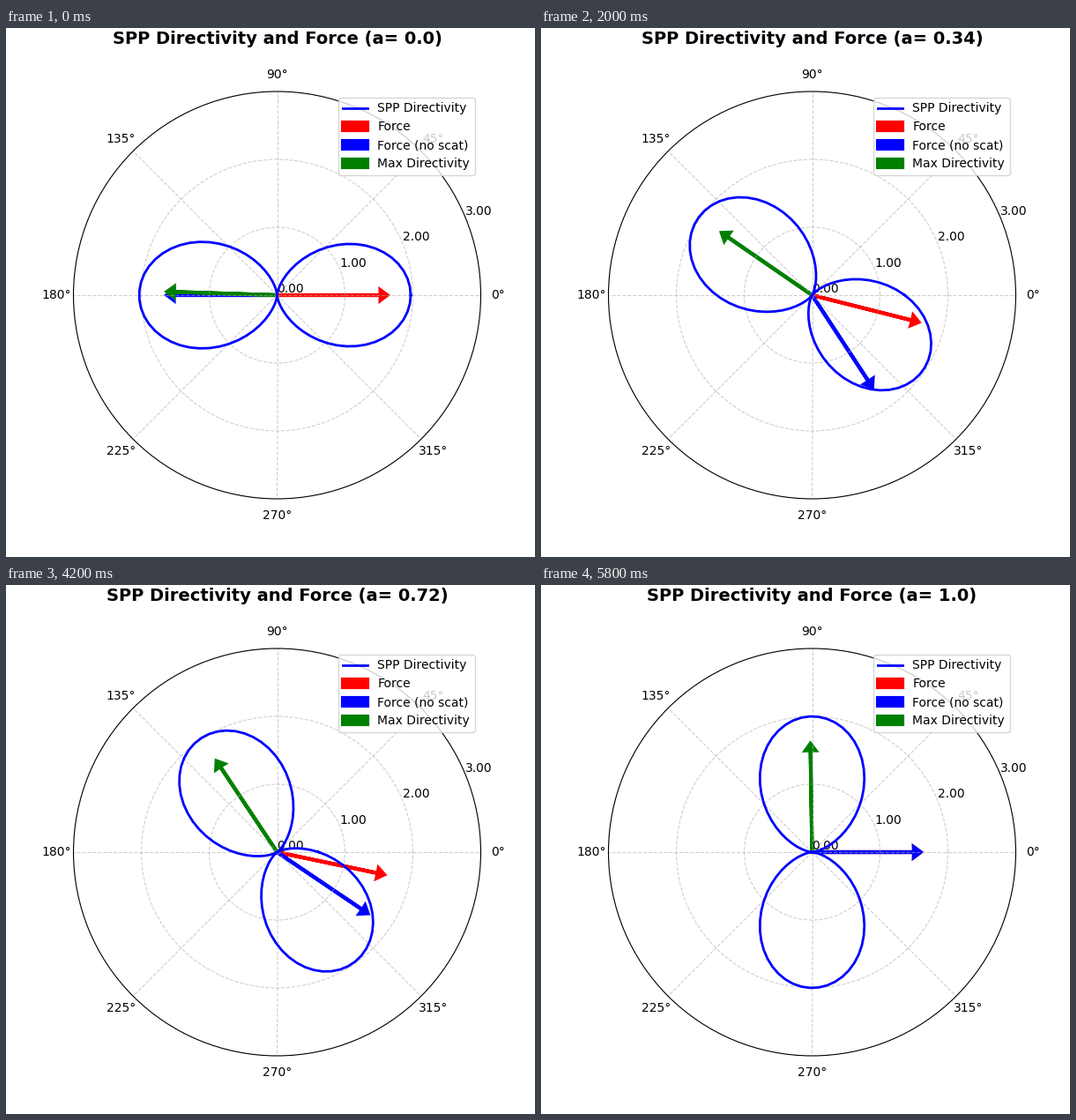
These frames come from a looping animation (600 px wide and 600 px high, 6000 ms). A matplotlib script:

```python
import numpy as np
import matplotlib.pyplot as plt
from matplotlib.animation import FuncAnimation

FRAMES = 30
RATIO = 0.917   # weight of the transverse dipole component
OFFSET = 0.008  # isotropic part of the longitudinal component

theta = np.linspace(0, 2 * np.pi, 100)
ratios = np.linspace(0, 1, FRAMES)


def directivity(a):
    amp = np.sqrt(1 - a) * (np.cos(theta) - OFFSET) - RATIO * np.sqrt(a) * np.sin(theta)
    power = (1 - a) * (1 + 2 * OFFSET**2) + RATIO**2 * a
    return 2 * amp**2 / power


def force_angle(a):
    return np.arctan2(-np.sqrt(a * (1 - a)), 1.65 + 0.67 * a)


def free_force_angle(a):
    fx = RATIO * a - 0.0075 * (1 - a)
    return np.arctan2(-np.sqrt(a * (1 - a)), fx)


fig = plt.figure(figsize=(6, 6), dpi=100)
ax = fig.add_subplot(projection="polar")
curve, = ax.plot(theta, directivity(0), color="blue", lw=2, label="SPP Directivity")


def add_arrow(color, label):
    return ax.arrow(0, 0, 0, 1.5, head_width=0.1, head_length=0.1,
                    color=color, lw=3, label=label)


force = add_arrow("red", "Force")
free_force = add_arrow("blue", "Force (no scat)")
peak = add_arrow("green", "Max Directivity")

ax.set_ylim(0, 3)
ax.set_yticks([0, 1, 2, 3], ["0.00", "1.00", "2.00", "3.00"])
ax.grid(True, linestyle="--", alpha=0.6)
ax.legend(loc="upper right")
title = ax.set_title("", fontsize=14, fontweight="bold", pad=20)


def update(i):
    a = ratios[i]
    r = directivity(a)
    curve.set_ydata(r)
    length = 0.75 * r.max()
    angles = force_angle(a), free_force_angle(a), theta[r.argmax()]
    for arrow, angle in zip((force, free_force, peak), angles):
        arrow.set_data(x=angle, y=0, dx=0, dy=length)
    title.set_text(f"SPP Directivity and Force (a= {round(float(a), 2)})")
    return curve, force, free_force, peak, title


anim = FuncAnimation(fig, update, frames=FRAMES, interval=200,
                     repeat=True, repeat_delay=0, blit=False)
plt.show()
```
